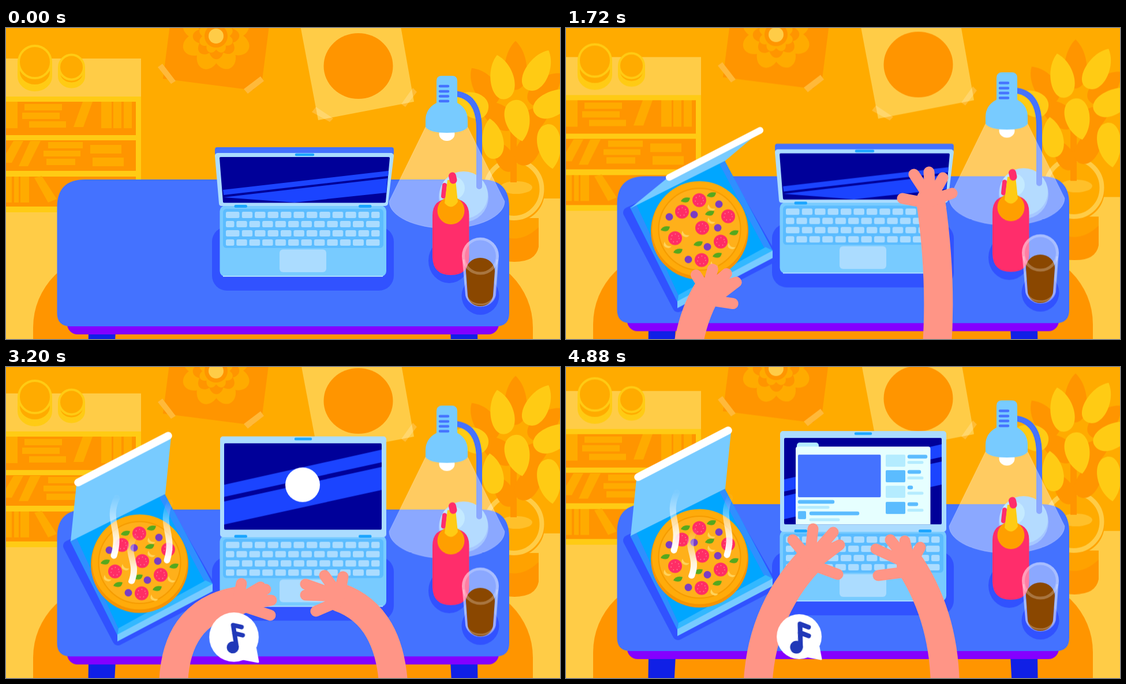
Write an HTML page without scripts that moves like this. It is 960 px wide and 540 px high and loops after 4.92 s.

```html
<!DOCTYPE html>
<html lang="en">
<head>
<meta charset="utf-8">
<title>Evening desk</title>
<style>
html,body{margin:0;width:100%;height:100%;overflow:hidden;background:#ffab00}
svg{display:block;width:960px;height:540px}
.go{animation:4920ms linear infinite both}
.round{stroke-linejoin:round;stroke-linecap:round}
.dark{fill:#ff9500}.mid{fill:#ffab00}.pale{fill:#ffcc47}.gold{fill:#ffcb14}
.sky{fill:#78cbff}.ice{fill:#abdcff}.blue{fill:#4472ff}.shade{fill:#3152ff}
.skin{stroke:#ff9586;fill:none}

/* camera drift; --k sets the depth */
#room{--k:.46;animation-name:drift}
#desk{--k:1;animation-name:drift}
@keyframes drift{
  0%{transform:translateY(0)}
  11.4%{transform:translateY(calc(var(--k)*-.8px))}
  26.8%{transform:translateY(calc(var(--k)*-3.2px))}
  43.1%{transform:translateY(calc(var(--k)*-8px))}
  65%{transform:translateY(calc(var(--k)*-15.5px))}
  85.4%{transform:translateY(calc(var(--k)*-22px))}
  100%{transform:translateY(calc(var(--k)*-25px))}
}

/* laptop */
#lid,#rim,#glass,#bands,#cam{animation-timing-function:cubic-bezier(.4,0,.3,1)}
#lid{animation-name:lid}
@keyframes lid{
  0%,34.5%{d:path("M367 222L667 222L657 304L374 304Z")}
  42.3%,100%{d:path("M376 141L654 141L654 306L376 306Z")}
}
#rim{animation-name:rim}
@keyframes rim{
  0%,34.5%{d:path("M366 211L668 211L668 217L366 217Z")}
  42.3%,100%{d:path("M376 141L654 141L654 150L376 150Z")}
}
#glass{animation-name:glass}
@keyframes glass{
  0%,34.5%{d:path("M372 226L663 226L656 301.5L378 301.5Z")}
  42.3%,100%{d:path("M380 150L649 150L649 296L380 296Z")}
}
#bands{animation-name:bands}
@keyframes bands{
  0%,34.5%{d:path("M376 281L663 248L662 257L377 290Z M377 294L661 261L659 286L500 303Z")}
  42.3%,100%{d:path("M378 220L651 159L651 181L378 241Z M378 249L651 189L651 229L378 289Z")}
}
#cam{animation-name:cam}
@keyframes cam{
  0%,34.5%{d:path("M503 220L532 220")}
  42.3%,100%{d:path("M502 140.5L528 140.5")}
}
#badge{animation-name:badge;transform-box:fill-box;transform-origin:center}
@keyframes badge{
  0%,48%{transform:scale(0);animation-timing-function:ease-out}
  52%{transform:scale(1.12)}
  55%,69%{transform:scale(1);animation-timing-function:ease-in}
  73%,100%{transform:scale(0)}
}
#page{animation-name:page}
@keyframes page{
  0%,72%{transform:translateY(145px);animation-timing-function:cubic-bezier(.2,.6,.4,1)}
  85.4%{transform:translateY(18px)}
  100%{transform:none}
}

/* pizza box */
#box{animation-name:box}
@keyframes box{
  0%,3.25%{transform:translate(56px,318px);animation-timing-function:ease-in-out}
  21.1%,100%{transform:none}
}
#flap{animation-name:flap}
@keyframes flap{
  0%,28%{d:path("M111 319L276 235L386 306L220 394Z");animation-timing-function:ease-in}
  34%{d:path("M111 319L276 236L356 194L192 278Z");animation-timing-function:ease-out}
  41%,100%{d:path("M112 318L276 236L286 137L122 220Z")}
}
#lip{animation-name:lip}
@keyframes lip{
  0%,28%{d:path("M224 391L381 309");stroke-width:9px;animation-timing-function:ease-in}
  34%{d:path("M194 279L352 197");stroke-width:11px;animation-timing-function:ease-out}
  41%,100%{d:path("M125 216L281 135");stroke-width:13.5px}
}
#steam{animation-name:steam}
@keyframes steam{0%,37%{opacity:0}42%,100%{opacity:1}}
.wisp{animation:wisp 1640ms ease-in-out infinite}
@keyframes wisp{
  0%,100%{d:path("M5 0C-14 40 14 54 0 100")}
  50%{d:path("M0 0C-10 50 18 48 0 100")}
}

/* arms: limb ends in the palm, fingers fan out from it */
#armL{animation-name:armL}
#armR{animation-name:armR}
#handL{animation-name:handL}
#handR{animation-name:handR}
#armL,#handL,#armR,#handR{animation-timing-function:ease-in-out}
@keyframes armL{
  0%,3.25%{d:path("M246 880Q248 828 256 776")}
  21.1%,28%{d:path("M190 565Q192 510 200 458")}
  40%,44%{d:path("M220 570Q232 500 268 460")}
  58%,66%{d:path("M290 565Q288 426 402 406")}
  73%,85.4%{d:path("M328 565Q328 440 416 346")}
  79%,92%,100%{d:path("M332 565Q334 430 422 336")}
}
@keyframes handL{
  0%,3.25%{d:path("M256 773L236 755L256 773L263 749L256 773L282 754L256 773L298 758L276 793L305 778")}
  21.1%,28%{d:path("M200 455L180 437L200 455L207 431L200 455L226 436L200 455L242 440L220 475L249 460")}
  40%,44%{d:path("M268 458L251 424L268 458L281 412L268 458L308 421L268 458L325 442L272 472L312 489")}
  58%,66%{d:path("M402 405L408 376L402 405L441 382L402 405L450 386L402 405L460 405L410 415L458 431")}
  73%,85.4%{d:path("M418 342L397 303L418 342L427 289L418 342L453 294L418 342L472 320L425 350L463 367")}
  79%,92%,100%{d:path("M422 334L393 300L422 334L428 281L422 334L463 287L422 334L474 309L428 344L471 360")}
}
@keyframes armR{
  0%,20%{d:path("M690 700Q660 680 640 660")}
  26.8%{d:path("M690 590Q665 575 645 558")}
  35%{d:path("M642 565Q652 440 632 300")}
  42%,45%{d:path("M637 565Q645 400 620 252")}
  56%,66%{d:path("M672 565Q668 432 578 400")}
  73%,92%,100%{d:path("M657 565Q658 440 598 346")}
  79%,85.4%{d:path("M670 565Q672 450 594 372")}
}
@keyframes handR{
  0%,20%{d:path("M640 660L565 632L640 660L590 645L640 660L600 660L640 660L610 675L640 660L560 670")}
  26.8%{d:path("M645 558L565 530L645 558L590 545L645 558L600 560L645 558L610 575L645 558L570 572")}
  35%{d:path("M632 298L603 254L632 298L629 250L632 298L653 260L632 298L669 287L625 304L583 296")}
  42%,45%{d:path("M620 250L591 206L620 250L617 202L620 250L641 212L625 256L657 239L612 256L571 248")}
  56%,66%{d:path("M578 398L519 396L578 398L519 377L578 398L552 362L578 398L584 364L574 408L537 424")}
  73%,92%,100%{d:path("M597 344L537 316L597 344L562 300L597 344L587 302L597 344L614 313L588 356L541 362")}
  79%,85.4%{d:path("M594 370L552 380L594 370L540 356L594 370L575 347L594 370L602 352L588 385L544 392")}
}

/* music bubble */
#bubble{animation-name:bubble}
@keyframes bubble{
  0%,42%{transform:translate(473px,556px) scale(.2)}
  43.1%{transform:translate(473px,546px) scale(.25);animation-timing-function:ease-out}
  53%{transform:translate(395px,474px) scale(1)}
  65%{transform:translate(395px,469px) scale(1.1)}
  75%{transform:translate(402px,474px) scale(1.05)}
  85.4%{transform:translate(405px,471px) scale(.98)}
  100%{transform:translate(404px,468px) scale(1)}
}
#note{animation-name:note}
@keyframes note{
  0%,53%{transform:scale(.9) rotate(6deg)}
  65%{transform:rotate(-4deg)}
  75%{transform:scale(1.1) rotate(6deg)}
  85.4%{transform:scale(.88)}
  100%{transform:scale(1.18) rotate(4deg)}
}
</style>
</head>
<body>
<svg viewBox="0 0 960 540">
<defs>
  <path id="leaf" d="M0-37C26-16 26 35 0 37S-26-16 0-37Z"/>
  <ellipse id="petal" rx="19" ry="25" cy="-36"/>
  <g id="petals">
    <use href="#petal" transform="rotate(22)"/><use href="#petal" transform="rotate(67)"/>
    <use href="#petal" transform="rotate(112)"/><use href="#petal" transform="rotate(157)"/>
    <use href="#petal" transform="rotate(202)"/><use href="#petal" transform="rotate(247)"/>
    <use href="#petal" transform="rotate(292)"/><use href="#petal" transform="rotate(337)"/>
  </g>
  <path id="basil" d="M-8 2Q-4-7 8-4Q6 8-8 2Z" fill="#55a81e"/>
  <g id="salami" fill="#ff2d65">
    <circle r="12"/>
    <circle r="7" fill="none" stroke="#ff8aa8" stroke-width="1.500" stroke-dasharray="1.500 5"/>
  </g>
  <circle id="olive" r="6.5" fill="#7a3cc4"/>
  <path id="onion" d="M-6-4Q-4 5 6 4Q2 9-4 6T-6-4Z" fill="#ffd35c"/>
  <pattern id="keysEven" x="399.2" y="319" width="22.45" height="32" patternUnits="userSpaceOnUse">
    <rect y="16" width="18.5" height="11" rx="2.5" class="ice"/>
  </pattern>
  <pattern id="keysOdd" x="408.6" y="319" width="22.45" height="32" patternUnits="userSpaceOnUse">
    <rect width="18.5" height="11" rx="2.5" class="ice"/>
  </pattern>
  <linearGradient id="fade" x2="0" y2="1">
    <stop stop-color="#fff" stop-opacity=".05"/>
    <stop offset=".7" stop-color="#fff" stop-opacity=".85"/>
    <stop offset="1" stop-color="#fff"/>
  </linearGradient>
  <clipPath id="view"><rect x="378" y="148" width="273" height="150" rx="4"/></clipPath>
</defs>

<rect width="960" height="540" class="mid"/>
<g id="room" class="go">
  <path class="pale" d="M0 53H234V300H0ZM0 318H234V600H0ZM700 296H960V600H700Z"/>
  <!-- shelf -->
  <path class="gold" d="M0 119H234V320H0Z"/>
  <path class="dark" d="M0 128H225V186H0ZM0 195H225V248H0ZM0 258H225V310H0Z"/>
  <path class="mid" d="M0 128H20V174H0ZM32 132H97V143H32ZM28 147H93V158H28ZM40 162H104V173H40ZM133 128H150L134 172H117ZM165 128H183V174H165ZM186 128H200V174H186ZM204 128H218V174H204Z
    M13 196H30L10 234H0V218ZM42 196H60L38 240H22ZM73 198H133V209H73ZM65 213H129V223H65ZM70 227H120V238H70ZM146 203H200V218H146ZM150 225H204V240H150ZM0 258H10V303H0ZM14 258H22V303H14ZM25 258H40V303H25ZM49 260L62 257 88 297 73 303Z"/>
  <g class="mid" stroke="#ffcb14" stroke-width="4">
    <path fill="#ffcb14" d="M22 60V84A28 24 0 0 0 78 84V60ZM92 70V84A21 18 0 0 0 135 84V70Z"/>
    <path d="M22 66V76A28 24 0 0 0 78 76V66ZM92 72V78A21 18 0 0 0 135 78V72Z"/>
    <circle cx="50" cy="59" r="28"/><circle cx="113.500" cy="68" r="21.500"/>
  </g>
  <!-- posters -->
  <path class="dark" d="M286-20L272 88 428 108 444 90 458-20Z"/>
  <g transform="translate(364 14)">
    <use href="#petals" class="mid"/>
    <use href="#petals" class="dark" transform="rotate(22) scale(.66)"/>
    <use href="#petals" class="mid" transform="scale(.5)"/>
    <circle r="20" class="dark"/>
    <circle r="13" class="pale"/>
  </g>
  <path class="pale" d="M507-20L541 160 707 128 681-20Z"/>
  <ellipse cx="610.500" cy="66" rx="60" ry="57" class="dark"/>
  <path fill="#ffb93a" d="M271 62L294 92 286 97 263 68ZM412 106L441 84 447 92 419 114Z"/>
  <path fill="#fff" fill-opacity=".2" d="M537 137L567 157 561 163 530 146ZM685 132L705 104 712 111 692 137Z"/>
  <!-- plant -->
  <path class="dark" d="M838 330H923V380Q918 406 881 406T838 380Z"/>
  <path fill="#ffa200" d="M838 346Q881 385 923 346V330H838Z"/>
  <ellipse cx="880" cy="286" rx="53" ry="51" fill="#ffa200"/>
  <ellipse cx="880" cy="280" rx="48.500" ry="50" class="mid" stroke="#ffcc47" stroke-width="8"/>
  <ellipse cx="884" cy="277" rx="28" ry="11" fill="#ffc02a"/>
  <g class="dark">
    <path d="M874 180H885V268H874Z"/>
    <use href="#leaf" transform="translate(883 65) scale(1 1.150)"/>
    <use href="#leaf" transform="translate(828 100) rotate(-35)"/>
    <use href="#leaf" transform="translate(935 105) rotate(45)"/>
    <use href="#leaf" transform="translate(912 160) rotate(55)"/>
    <use href="#leaf" transform="translate(850 150) rotate(-55)"/>
    <use href="#leaf" transform="translate(908 205) rotate(30)"/>
    <use href="#leaf" transform="translate(862 222) rotate(-30) scale(.8)"/>
  </g>
  <g class="gold">
    <use href="#leaf" transform="translate(859 85) rotate(-12) scale(1.050)"/>
    <use href="#leaf" transform="translate(922 73) rotate(28) scale(1.050)"/>
    <use href="#leaf" transform="translate(952 129) rotate(62) scale(1.100)"/>
    <use href="#leaf" transform="translate(942 206) rotate(172) scale(1.050)"/>
    <use href="#leaf" transform="translate(887 161) rotate(168) scale(1.100 .98)"/>
    <use href="#leaf" transform="translate(843 192) rotate(-8) scale(.95)"/>
    <use href="#leaf" transform="translate(806 132) rotate(-65) scale(1.100 .85)"/>
  </g>
</g>

<g id="desk" class="go">
  <rect x="47" y="392" width="866" height="300" rx="128" class="dark"/>
  <path fill="#1020e6" d="M143 525H190L186 600H142ZM770 525H817L818 600H774Z"/>
  <rect x="106" y="490" width="748" height="42" rx="18" fill="#8400ff"/>
  <path class="blue" d="M137 263H824Q872 263 872 311V495Q872 518 849 518H112Q88.500 518 88.500 495V311Q88.500 263 137 263Z"/>

  <!-- lamp -->
  <ellipse cx="793" cy="294" rx="43" ry="43" fill="#6fa4ff"/>
  <ellipse cx="793" cy="290" rx="42" ry="41" fill="#86c4ff"/>
  <circle cx="775" cy="278" r="20" fill="#9fdcff"/>
  <path d="M778 114Q820 118 820 176V275" fill="none" stroke="#4472ff" stroke-width="10" stroke-linecap="round"/>
  <path d="M727 172L664 301A100 47 0 0 0 864 301L800 172Z" fill="#fff" fill-opacity=".38"/>
  <path d="M727 172L664 301A100 47 0 0 0 864 301L800 172" fill="none" stroke="#fff" stroke-opacity=".25"/>
  <ellipse cx="764" cy="184" rx="13.500" ry="12" fill="#fff"/>
  <path class="sky" d="M746 92Q746 83 755 83H773Q782 83 782 92V130Q800 140 800 160V172Q794 182 764 182T727 172V160Q727 140 746 130Z"/>
  <path d="M752 101H766M752 110H766M752 118.500H766M752 127H766" stroke="#4472ff" stroke-width="4.500" stroke-linecap="round"/>

  <!-- laptop -->
  <rect x="357" y="345" width="315" height="111" rx="26" class="shade"/>
  <rect x="370.500" y="308" width="288.500" height="124" rx="10" class="sky"/>
  <path d="M376 431H653" stroke="#abdcff" stroke-width="2"/>
  <rect x="376" y="314" width="278" height="68" rx="6" fill="#5bbcff"/>
  <rect x="399.200" y="319" width="201" height="64" fill="url(#keysEven)"/>
  <rect x="408.600" y="319" width="222" height="64" fill="url(#keysOdd)"/>
  <g class="ice">
    <rect x="381" y="319" width="23.500" height="11" rx="2.500"/><rect x="633" y="319" width="14.500" height="11" rx="2.500"/>
    <rect x="381" y="335" width="14.500" height="11" rx="2.500"/><rect x="601" y="335" width="19" height="11" rx="2.500"/><rect x="624" y="335" width="23.500" height="11" rx="2.500"/>
    <rect x="381" y="351" width="23.500" height="11" rx="2.500"/><rect x="633" y="351" width="14.500" height="11" rx="2.500"/>
    <rect x="381" y="367" width="14.500" height="11" rx="2.500"/><rect x="601" y="367" width="19" height="11" rx="2.500"/><rect x="624" y="367" width="23.500" height="11" rx="2.500"/>
    <rect x="474" y="384.500" width="81" height="39.500" rx="6"/>
  </g>
  <path id="rim" class="go round blue" stroke="#4472ff" stroke-width="8"/>
  <path id="lid" class="go round ice" stroke="#abdcff" stroke-width="10"/>
  <path id="glass" class="go round" fill="#000099" stroke="#000099" stroke-width="4"/>
  <path id="bands" class="go" fill="#1b44ff"/>
  <path id="cam" class="go round" stroke="#1aa5ff" stroke-width="4.500"/>
  <path d="M398 309.500H415.500M613.500 309.500H631" stroke="#1aa5ff" stroke-width="5" stroke-linecap="round"/>
  <g clip-path="url(#view)">
    <circle id="badge" class="go" cx="514" cy="220" r="30" fill="#fff"/>
    <g id="page" class="go">
      <rect x="400" y="155" width="38" height="20" rx="5" fill="#b4ecff"/>
      <rect x="398" y="162" width="233.500" height="200" rx="4" fill="#e6ffff"/>
      <rect x="402" y="176" width="143.500" height="74" rx="2" class="blue"/>
      <g fill="#b4ecff">
        <rect x="554" y="176" width="34" height="21" rx="2"/><rect x="554" y="230" width="34" height="21" rx="2"/>
        <path class="round" d="M594 189.500H617M594 216.500H617M594 243H617M594 272.500H617M404 267.500H454M424 289H472" stroke="#b4ecff" stroke-width="5"/>
      </g>
      <g fill="#5bbcff">
        <rect x="554" y="203" width="34" height="21" rx="2"/><rect x="554" y="258" width="34" height="21" rx="2"/>
        <rect x="402" y="274" width="14" height="14" rx="2"/>
        <path class="round" d="M595 179.500H623M595 206H612M595 233H598M595 262H607M405 258H462M425 278H505" stroke="#5bbcff" stroke-width="6.500"/>
      </g>
    </g>
  </g>

  <!-- sauce bottle -->
  <ellipse cx="768" cy="404" rx="36" ry="39" class="shade"/>
  <path fill="#ff2d6b" d="M739 326Q739 296 771 296T802.500 326V398Q802 429 771 429T739 398Z"/>
  <path d="M760 273L758 292" stroke="#ff2d6b" stroke-width="8" stroke-linecap="round"/>
  <ellipse cx="771" cy="317" rx="23.500" ry="24" fill="#ff9f00"/>
  <path fill="#ffcb14" d="M765 264H779L783 302Q772 318 760 304Z"/>
  <path d="M773.500 257L775 264" stroke="#ff2d6b" stroke-width="13" stroke-linecap="round"/>

  <!-- drink -->
  <ellipse cx="822" cy="465" rx="32.500" ry="33" class="shade"/>
  <path d="M790 396A32 32 0 0 1 854 396L849 464A27 25 0 0 1 796 464Z" fill="#fff" fill-opacity=".38"/>
  <path d="M797 422A25 23 0 0 1 847 422L844 463A22 20 0 0 1 800 463Z" fill="#8a4700"/>
  <ellipse cx="822" cy="396" rx="29.500" ry="30" fill="none" stroke="#fff" stroke-opacity=".25" stroke-width="5"/>
  <path d="M793 402L798 465A25 21 0 0 0 846 465L851 402" fill="none" stroke="#fff" stroke-opacity=".25" stroke-width="3"/>

  <!-- pizza -->
  <g id="box" class="go">
    <path class="round shade" d="M108 326L194 490 358 404 270 250Z" stroke="#3152ff" stroke-width="18"/>
    <path fill="#00a6ff" d="M111 317L275 236 358 392 193 481Z"/>
    <path fill="#2f8fff" d="M275 236L358 392 346 392 266 242ZM111 317L193 481 195 470 122 312Z"/>
    <path fill="#33b8ff" d="M193 481L358 392 346 386 195 469Z"/>
    <path class="sky" d="M193 480L358 392V405L193 492Z"/>
    <circle cx="231.500" cy="358" r="84.500" fill="#f59300"/>
    <circle cx="231.500" cy="354" r="82.500" fill="#ffab0a"/>
    <circle cx="231.500" cy="355" r="71" fill="#ffb01a" stroke="#f59b00" stroke-width="2"/>
    <g transform="translate(0 15.500)">
      <use href="#onion" x="253" y="300"/><use href="#onion" x="253" y="323"/><use href="#onion" x="208" y="346"/>
      <use href="#onion" x="288" y="367"/><use href="#onion" x="177" y="365"/><use href="#onion" x="258" y="399"/>
      <use href="#salami" x="231" y="289"/><use href="#salami" x="201" y="309"/><use href="#salami" x="236" y="337"/>
      <use href="#salami" x="281" y="317"/><use href="#salami" x="189" y="355"/><use href="#salami" x="268" y="361"/><use href="#salami" x="235" y="393"/>
      <use href="#olive" x="265" y="296"/><use href="#olive" x="179" y="318"/><use href="#olive" x="222" y="314"/>
      <use href="#olive" x="263" y="337"/><use href="#olive" x="245" y="370"/><use href="#olive" x="212" y="392"/>
      <use href="#basil" x="207" y="289"/><use href="#basil" x="252" y="280"/><use href="#basil" x="172" y="339"/><use href="#basil" x="291" y="346"/>
      <use href="#basil" x="194" y="378"/><use href="#basil" x="249" y="312"/><use href="#basil" x="229" y="365"/><use href="#basil" x="262" y="385"/>
    </g>
    <path id="flap" class="go sky"/>
    <path id="lip" class="go round" stroke="#fff"/>
    <g id="steam" class="go round" fill="none" stroke="url(#fade)" stroke-width="11">
      <g transform="translate(187 243)"><path class="wisp"/></g>
      <g transform="translate(217.500 310) scale(1 .78)"><path class="wisp"/></g>
      <g transform="translate(279 251)"><path class="wisp"/></g>
    </g>
  </g>
</g>

<g class="skin round">
  <path id="armL" class="go" stroke-width="50"/>
  <path id="handL" class="go" stroke-width="19"/>
  <path id="armR" class="go" stroke-width="50"/>
  <path id="handR" class="go" stroke-width="19"/>
</g>

<g id="bubble" class="go">
  <path class="round" d="M34 18L38 39 12 34Z" fill="#fff" stroke="#fff" stroke-width="3"/>
  <circle r="39" fill="#fff"/>
  <g id="note" class="go">
    <circle cx="-3" cy="16" r="9.500" fill="#2038b8"/>
    <path class="round" d="M3 15L0-19 13-15M1-6L14-2" fill="none" stroke="#2038b8" stroke-width="7"/>
  </g>
</g>
</svg>
</body>
</html>
```
